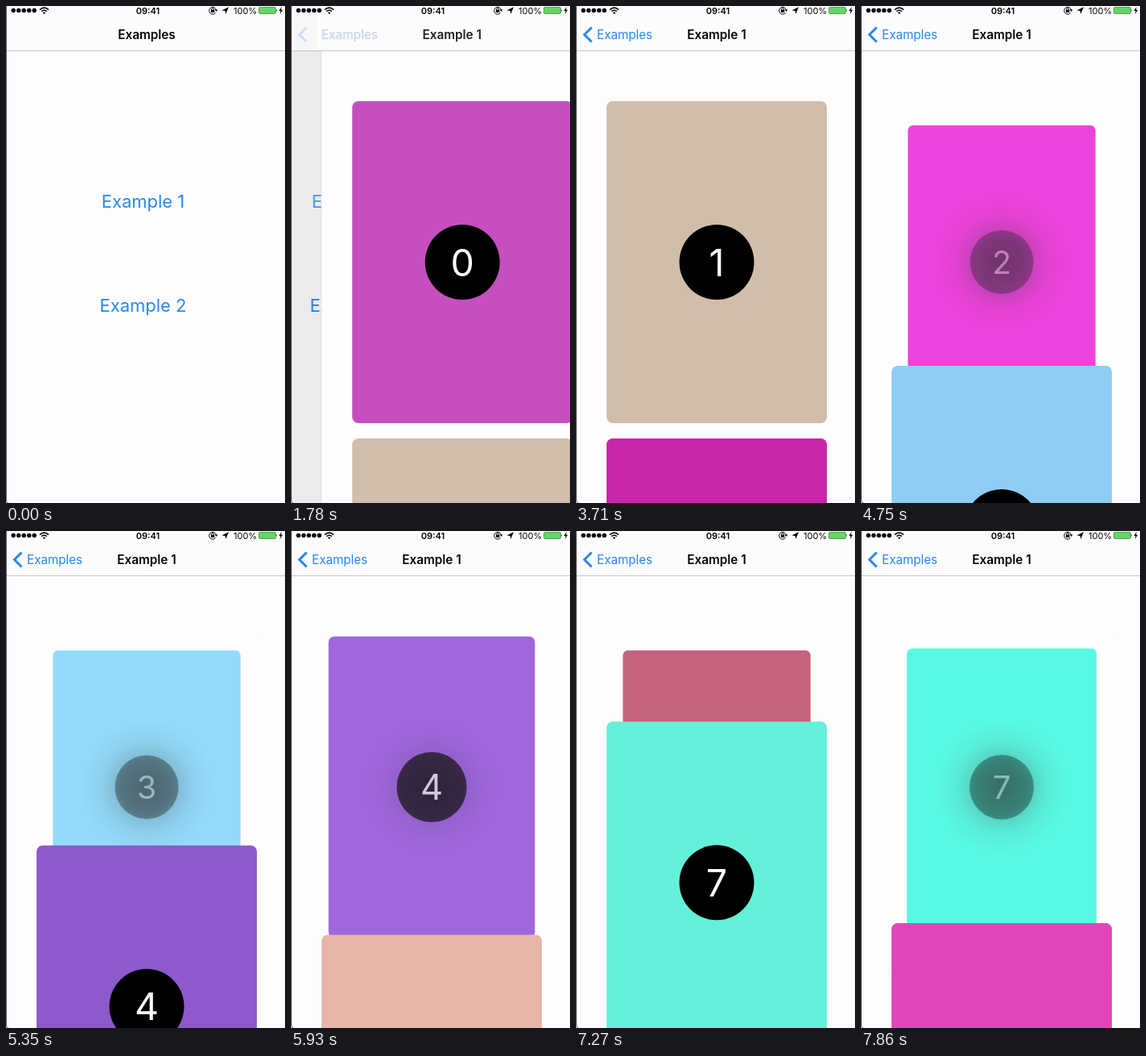
An HTML page for the animation above (8 s loop, 347 by 616 pixels).

```html
<!DOCTYPE html>
<html lang="en">
<head>
<meta charset="utf-8">
<title>Card stack</title>
<style>
  html, body { margin: 0; width: 100%; height: 100%; overflow: hidden; background: #fdfdfd; }
  svg { display: block; width: 347px; height: 616px; font-family: Inter, Roboto, sans-serif; }
  .mid { text-anchor: middle; }
  .title { font-size: 15.3px; font-weight: 600; fill: #050505; }
  .link { fill: #2987f0; }
  .button { font-size: 22px; }
  .digit { font-size: 46.5px; fill: #fff; }
</style>
</head>
<body>
<svg viewBox="0 0 347 616">
  <defs>
    <radialGradient id="glow">
      <stop offset="0" stop-color="#4d4d4d" stop-opacity=".56"/>
      <stop offset=".38" stop-color="#4d4d4d" stop-opacity=".4"/>
      <stop offset=".5" stop-color="#4d4d4d" stop-opacity=".27"/>
      <stop offset=".7" stop-color="#4d4d4d" stop-opacity=".1"/>
      <stop offset="1" stop-color="#4d4d4d" stop-opacity="0"/>
    </radialGradient>
  </defs>
  <rect width="347" height="616" fill="#fdfdfd"/>

  <g id="menu">
    <text id="pressed" class="mid link button" x="170.5" y="250">Example 1</text>
    <text class="mid link button" x="170.5" y="379">Example 2</text>
  </g>
  <rect id="dim" y="56" width="347" height="560"/>

  <g id="stack">
    <rect x="-1" y="56" width="1" height="560" fill="#000" opacity=".06"/>
    <rect y="56" width="348" height="560" fill="#fdfdfd"/>
    <g id="cards"></g>
  </g>

  <rect width="347" height="55" fill="#fcfcfc"/>
  <rect id="barEdge" height="55" fill="#f7f7f7"/>
  <rect y="55" width="347" height="1" fill="#c4c4c4"/>
  <text id="oldTitle" class="mid title" y="40.5">Examples</text>
  <text id="newTitle" class="mid title" y="40.5">Example 1</text>
  <path id="chevron" d="M19.5 26.5L10.5 35.5L19.5 44.5" fill="none" stroke="#2987f0" stroke-width="3"/>
  <text id="back" class="link" y="40.5" font-size="15.2">Examples</text>

  <g id="status">
    <path d="M42 4.6Q47.5 -.4 53 4.6M44.2 6.7Q47.5 3.8 50.8 6.7" fill="none" stroke="#000" stroke-width="1.6"/>
    <path d="M45.7 8.2Q47.5 6.6 49.3 8.2L47.5 10Z"/>
    <text class="mid" x="176.5" y="9.6" font-size="11" font-weight="600">09:41</text>
    <g fill="none" stroke="#000">
      <path d="M260.6 8.4A4.4 4.4 0 1 1 261.4 5"/>
      <path d="M255.7 5V4A1.4 1.4 0 0 1 258.5 4V5" stroke-width=".9"/>
    </g>
    <path d="M254.9 4.8h4.4v3.2h-4.4zM259.7 4.6h3.6L261.5 7zM277 1.2L273.2 10L272.6 6.1L268.4 5.4Z"/>
    <text x="283" y="9.6" font-size="11">100%</text>
    <rect x="314.5" y="1.5" width="21" height="8" rx="1.3" fill="#62d665" stroke="#4a8a4d" stroke-width=".8"/>
    <path d="M336 4q1.6 1.5 0 3zM342.8 1L339.4 6.1H341.6L340.6 10.3L344.2 4.8H342Z"/>
  </g>
  <path d="M.5 0V613Q.5 615.5 3 616" fill="none" stroke="#6a6a6a"/>
</svg>
<script>
const LOOP = 8000, TICK = 148.1, FIRST = 600, PUSH = 1490;
const WIDTH = 348, CX = 175, CY = 317.5, CARD_W = 274, CARD_H = 399, PITCH = 418;
const colors = '#c54fbf #d0beab #c926a9 #90cdf3 #8e59cb #e6b6aa #944459 #64f1d9 #e245b8'.split(' ');
// Each swipe moves the stack on by one card: [start, duration]
const swipes = [
  [2630, 1080], [3960, 340], [4597, 500], [5140, 500],
  [5842, 500], [6385, 440], [6940, 500], [7749, 500]
];

const $ = id => document.getElementById(id);
const clamp = (v, lo = 0, hi = 1) => Math.min(hi, Math.max(lo, v));
const smooth = x => x * x * (3 - 2 * x);

function set(el, attrs) {
  for (const key in attrs) el.setAttribute(key, attrs[key]);
}

function make(parent, tag, attrs, text = '') {
  const el = document.createElementNS('http://www.w3.org/2000/svg', tag);
  set(el, attrs);
  el.textContent = text;
  return parent.appendChild(el);
}

// Light frosted look: boosted saturation under 30% white
function frosted(hex) {
  const c = [1, 3, 5].map(at => parseInt(hex.slice(at, at + 2), 16));
  const luma = .2126 * c[0] + .7152 * c[1] + .0722 * c[2];
  const mixed = c.map(v => Math.round(.7 * clamp(luma + 1.8 * (v - luma), 0, 255) + .3 * 255));
  return `rgb(${mixed})`;
}

function makeCard(color, i) {
  const box = { x: -CARD_W / 2, y: -CARD_H / 2, width: CARD_W, height: CARD_H, rx: 7.5 };
  const group = make($('cards'), 'g', {});
  make(group, 'rect', { ...box, fill: color });
  make(group, 'circle', { r: 46.5 });
  make(group, 'text', { class: 'mid digit', y: 17 }, i);
  const veil = make(group, 'g', {});
  make(veil, 'rect', { ...box, fill: frosted(color) });
  make(veil, 'circle', { r: 98, fill: 'url(#glow)' });
  return { group, veil };
}

const cards = colors.map(makeCard);
for (let i = 0; i < 5; i++) make($('status'), 'circle', { cx: 9.2 + 6.5 * i, cy: 5.5, r: 2.7 });

function scrollAt(t) {
  return swipes.reduce((sum, [start, duration]) => sum + smooth(clamp((t - start) / duration)), 0);
}

// Cards rise into place, then shrink and blur under the next one
function drawCards(position) {
  cards.forEach(({ group, veil }, i) => {
    const past = position - i;
    const sunk = clamp(115 * Math.max(0, past) ** 2.27);
    const y = CY + Math.max(0, -past) * PITCH;
    set(group, {
      transform: `translate(${CX} ${y}) scale(${1 - .15 * sunk})`,
      visibility: past > 1.01 || past < -1.3 ? 'hidden' : 'visible'
    });
    set(veil, { opacity: Math.min(.7, .85 * sunk) });
  });
}

function drawPush(t) {
  // Critically damped spring: rest goes from 1 to 0
  const kt = Math.max(0, t - PUSH) * .0128;
  const spring = (1 + kt) * Math.exp(-kt);
  const rest = spring < .001 ? 0 : spring;
  const done = 1 - rest;
  const reveal = clamp(1 - 7.2 * rest);
  set($('menu'), { transform: `translate(${-.3 * WIDTH * done} 0)` });
  set($('pressed'), { opacity: t < PUSH - 5 ? 1 : clamp(.2 + (t - PUSH) / 520) });
  set($('dim'), { opacity: .08 * done });
  set($('stack'), { transform: `translate(${rest * WIDTH} 0)` });
  set($('barEdge'), { width: Math.max(0, WIDTH * rest - 6), opacity: rest < 1 ? 1 : 0 });
  set($('oldTitle'), { x: CX - 115 * done, opacity: rest ** 1.2 });
  set($('newTitle'), { x: CX + 230 * rest, opacity: done });
  set($('back'), { x: 26 + 115 * rest, opacity: reveal });
  set($('chevron'), { opacity: reveal });
}

// The picture advances in even steps
function draw(time) {
  const t = FIRST + Math.floor((time - FIRST + 7) / TICK) * TICK;
  drawPush(t);
  drawCards(scrollAt(t));
}

const start = performance.now();
function loop() {
  draw((performance.now() - start) % LOOP);
  requestAnimationFrame(loop);
}
loop();
</script>
</body>
</html>
```
